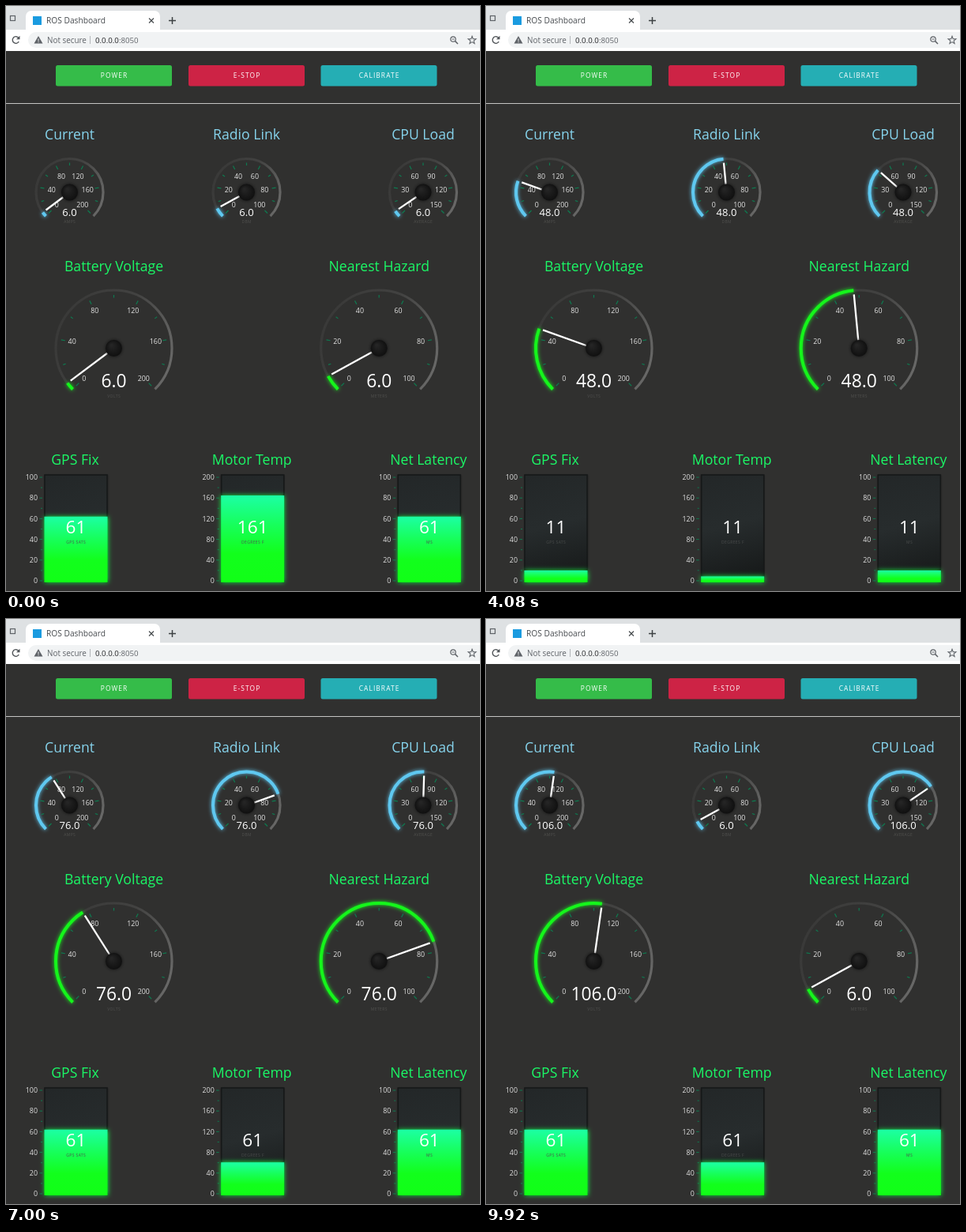
Write an HTML page with a canvas that moves like this. It is 600 by 741 pixels and loops after 10000 ms.

```html
<!DOCTYPE html>
<html lang="en">
<head>
<meta charset="utf-8">
<title>ROS Dashboard</title>
<style>
html, body { margin: 0; width: 600px; height: 741px; overflow: hidden; background: #30302f; }
canvas { display: block; }
</style>
</head>
<body>
<canvas id="stage" width="600" height="741"></canvas>
<script>
const ctx = document.getElementById('stage').getContext('2d');
const LOOP = 10000, TAU = Math.PI * 2;
const FONT = '"Open Sans", "Noto Sans", sans-serif';
const BLUE = '#5fc8f0', GREEN = '#15f51b';
const start = performance.now();

function text(str, x, y, size, color, { align = 'center', spacing = 0 } = {}) {
  ctx.font = `${size}px ${FONT}`;
  ctx.textAlign = align;
  ctx.letterSpacing = spacing + 'px';
  ctx.fillStyle = color;
  ctx.fillText(str, x + (align === 'center' ? spacing / 2 : 0), y);
}

function box(x, y, w, h, color, radius = 0) {
  ctx.fillStyle = color;
  ctx.beginPath();
  ctx.roundRect(x, y, w, h, radius);
  ctx.fill();
}

function path(points, color, width, close = false) {
  ctx.strokeStyle = color;
  ctx.lineWidth = width;
  ctx.beginPath();
  points.forEach(([x, y], i) => i ? ctx.lineTo(x, y) : ctx.moveTo(x, y));
  if (close) ctx.closePath();
  ctx.stroke();
}

function arc(x, y, r, from, to, color, width) {
  ctx.strokeStyle = color;
  ctx.lineWidth = width;
  ctx.beginPath();
  ctx.arc(x, y, r, from, to);
  ctx.stroke();
}

function gradient(x0, y0, x1, y1, ...colors) {
  const g = ctx.createLinearGradient(x0, y0, x1, y1);
  colors.forEach((c, i) => g.addColorStop(i / (colors.length - 1), c));
  return g;
}

function glow(color, blur, draw) {
  ctx.save();
  ctx.shadowColor = color;
  ctx.shadowBlur = blur;
  draw();
  ctx.restore();
}

function drawBrowser() {
  const gray = '#5f6368';
  box(0, 0, 600, 31, '#dee1e3');
  box(0, 30, 600, 27, '#fff');
  box(25, 6, 170, 25, '#fff', [7, 7, 0, 0]);
  box(34, 13, 11, 11, '#1a9be0');
  text('ROS Dashboard', 51, 22, 10.2, '#45494d', { align: 'left' });
  ctx.strokeStyle = gray;
  ctx.lineWidth = 1.2;
  ctx.strokeRect(5.5, 12.5, 6, 6);
  path([[181, 15.5], [187, 21.5]], '#4a4d50', 1.3);
  path([[187, 15.5], [181, 21.5]], '#4a4d50', 1.3);
  path([[206, 18.5], [215, 18.5]], '#3c4043', 1.5);
  path([[210.5, 14], [210.5, 23]], '#3c4043', 1.5);

  box(28, 33, 600, 20, '#f1f3f4', 10);
  arc(12.5, 43, 4.2, 0.5, TAU - 0.7, '#505458', 1.4);
  ctx.fillStyle = '#505458';
  ctx.beginPath();
  ctx.moveTo(17.5, 37.8);
  ctx.lineTo(17.5, 42.3);
  ctx.lineTo(13, 42.3);
  ctx.fill();

  ctx.fillStyle = gray;
  ctx.beginPath();
  ctx.moveTo(41, 38);
  ctx.lineTo(46.5, 47.5);
  ctx.lineTo(35.5, 47.5);
  ctx.fill();
  box(40.5, 41.5, 1, 3, '#f1f3f4');
  box(40.5, 45.3, 1, 1, '#f1f3f4');
  text('Not secure', 52, 46.7, 9.9, gray, { align: 'left' });
  box(106, 38, 1, 10, '#b4b7ba');
  text('0.0.0.0', 113, 46.7, 9.7, '#202124', { align: 'left' });
  const hostWidth = ctx.measureText('0.0.0.0').width;
  text(':8050', 113 + hostWidth, 46.7, 9.7, gray, { align: 'left' });

  arc(566, 42, 3.2, 0, TAU, gray, 1.2);
  path([[568.4, 44.4], [572, 48]], gray, 1.5);
  path([[564.5, 42], [567.5, 42]], gray, 1);
  const star = Array.from({ length: 10 }, (_, i) => {
    const a = i * TAU / 10, r = i % 2 ? 2.2 : 5.2;
    return [590 + r * Math.sin(a), 43.4 - r * Math.cos(a)];
  });
  path(star, gray, 1.1, true);
}

function drawButton(x, label, color) {
  box(x, 75, 147, 26.5, color, 2.5);
  text(label, x + 73.5, 91.2, 8.4, '#fff', { spacing: 1.1 });
}

const SMALL = { y: 236, r: 42.5, labelR: 23, tickR: 37.5, needle: 37.5, titleY: 169, valueY: 266.4, valueSize: 13, unitY: 274.8, title: '#86d3ec', fill: BLUE };
const LARGE = { y: 433.5, r: 73.5, labelR: 53.5, tickR: 67.5, needle: 68.5, titleY: 336, valueY: 483.2, valueSize: 22.8, unitY: 495.8, title: '#1bf866', fill: GREEN };

function drawGauge(style, x, title, unit, max, value) {
  const { y, r } = style;
  const angle = v => (v / max - 0.5) * TAU * 0.75 - TAU / 4;
  const at = (a, d) => [x + d * Math.cos(a), y + d * Math.sin(a)];
  const first = angle(0), now = angle(value);

  text(title, x, style.titleY, 17.65, style.title);
  const track = gradient(x - r, y - r * 0.4, x + r, y + r * 0.4, '#393938', '#424241', '#6a6a69');
  arc(x, y, r, first, angle(max), track, 3.2);
  if (value > 0) glow(style.fill, 5, () => arc(x, y, r, first, now, style.fill, 4));

  for (let i = 0; i <= 10; i++) {
    const a = angle(max * i / 10);
    path([at(a, style.tickR - (i % 2 ? 3.5 : 5)), at(a, style.tickR)], '#0d7b50', 1.2);
    if (i % 2) continue;
    const [lx, ly] = at(a, style.labelR);
    text(String(max * i / 10), lx, ly + 3.2, 8.9, '#e4e4e4');
  }

  text(unit, x, style.unitY, 5, '#51514f', { spacing: 0.4 });
  path([[x, y], at(now, style.needle)], '#fff', 2.3);
  const hub = ctx.createRadialGradient(x - 3, y - 4, 1, x, y, 11);
  hub.addColorStop(0, '#252525');
  hub.addColorStop(1, '#0f0f0f');
  glow('#111', 4, () => box(x - 10.5, y - 10.5, 21, 21, hub, 10.5));
  text(value.toFixed(1), x, style.valueY, style.valueSize, '#fff');
}

function drawTank(left, title, unit, max, value) {
  const top = 593.5, bottom = 730, width = 80, center = left + width / 2;
  text(title, center - 1, 581, 17.65, '#1bf866');
  for (let i = 0; i <= 10; i++) {
    const y = 728 - i * 13.1;
    path([[left - (i % 2 ? 4.5 : 6), y], [left - 2.5, y]], '#0d7b50', 1);
    if (i % 2 === 0) text(String(max * i / 10), left - 8.5, y + 3.2, 8.9, '#e0e0e0', { align: 'right' });
  }
  glow('#111', 3, () => box(left, top, width, bottom - top, '#1b1e1e'));
  box(left, top, width, bottom - top, gradient(left, top, left + 35, bottom, '#232728', '#272c2d', '#171a1a'));
  ctx.strokeStyle = '#161818';
  ctx.lineWidth = 1.5;
  ctx.strokeRect(left + 0.5, top + 0.5, width - 1, bottom - top - 1);

  const height = (bottom - top) * value / max, level = bottom - height;
  const liquid = gradient(0, level, 0, bottom, '#1cffa4', '#17ff5c', '#12ff1c', '#11ff17');
  glow('#12f545', 6, () => box(left, level, width, height, liquid));
  text(String(value), center, 668.2, 22.6, '#fff');
  text(unit, center, 680.8, 5, '#4b4e4d', { spacing: 0.4 });
}

function draw(t) {
  const count = 6 + 2 * Math.floor((t + 120) / 200);
  const early = t < 400;
  const level = early || t >= 5400 ? 61 : 11;

  box(0, 0, 600, 741, '#30302f');
  drawBrowser();
  drawButton(63, 'POWER', '#35bc49');
  drawButton(231, 'E-STOP', '#cd2345');
  drawButton(398.5, 'CALIBRATE', '#25aeb4');
  box(0, 123, 600, 1, '#c4c4c3');

  drawGauge(SMALL, 80.5, 'Current', 'AMPS', 200, count);
  drawGauge(SMALL, 304.5, 'Radio Link', 'DBM', 100, count % 100);
  drawGauge(SMALL, 528, 'CPU Load', 'AVERAGE', 150, count);
  drawGauge(LARGE, 136.5, 'Battery Voltage', 'VOLTS', 200, count);
  drawGauge(LARGE, 472.2, 'Nearest Hazard', 'METERS', 100, count % 100);

  drawTank(48.5, 'GPS Fix', 'GPS SATS', 100, level);
  drawTank(272.2, 'Motor Temp', 'DEGREES F', 200, early ? 161 : level);
  drawTank(495.8, 'Net Latency', 'MS', 100, level);
}

function tick() {
  draw((performance.now() - start) % LOOP);
  requestAnimationFrame(tick);
}
tick();
</script>
</body>
</html>
```
